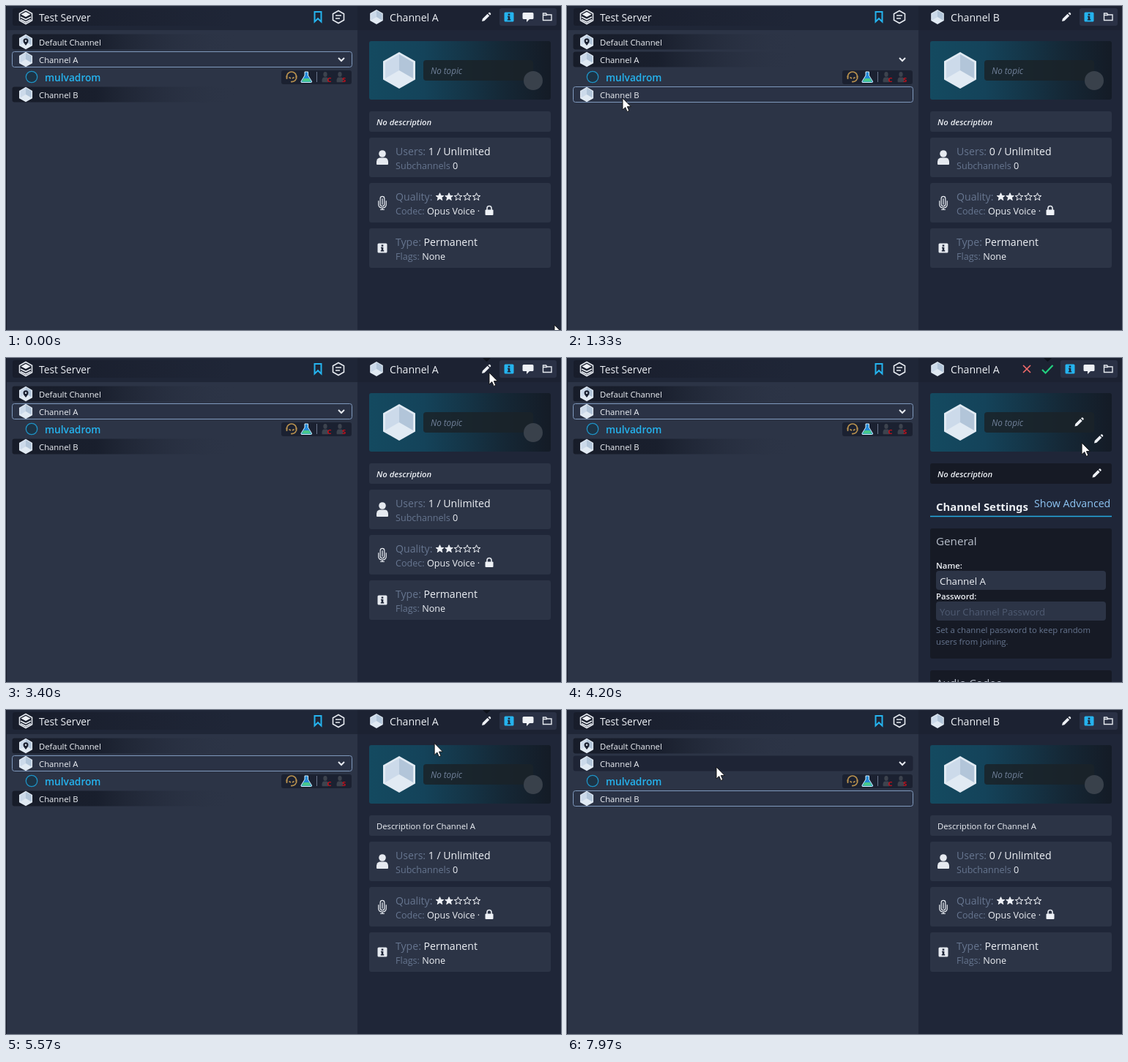
An HTML page for the animation above (8 s loop, 758 px wide and 443 px high).

```html
<!DOCTYPE html>
<html lang="en">
<head>
<meta charset="utf-8">
<title>Channel editing</title>
<style>
  html, body { margin: 0; width: 100%; height: 100%; overflow: hidden; background: #2c3446; }
  svg { display: block; width: 758px; height: 443px; }
  text { font: 500 11.3px "Open Sans", "Noto Sans", sans-serif; fill: #eef1f6; }
  .big { font-size: 14.1px; }
  .mid { font-size: 12.6px; }
  .label { fill: #66758f; font-weight: 400; }
  .strong { font-weight: 600; }
  .section { font-size: 15.2px; font-weight: 400; fill: #b9c0cc; }
  .badge { font-size: 9.5px; font-weight: 700; fill: #c9101b; }
  .card { fill: #2c3446; }
  .dark { fill: #161a25; }
  .user { font-size: 13.7px; font-weight: 600; fill: #25b3ee; }
  .title { font: 700 23px "Noto Sans", "Open Sans", sans-serif; font-stretch: 62.5%; }
  .line { fill: none; stroke: #e6eaf0; stroke-width: 1.6; }
</style>
</head>
<body>
<svg viewBox="0 0 758 443">
  <defs>
    <linearGradient id="rowFade">
      <stop stop-color="#171c29"/><stop offset=".25" stop-color="#191f2d"/>
      <stop offset=".66" stop-color="#2c3446" stop-opacity="0"/>
    </linearGradient>
    <linearGradient id="headFade">
      <stop stop-color="#181d2b"/><stop offset=".65" stop-color="#1f2637"/>
    </linearGradient>
    <linearGradient id="bannerFade">
      <stop stop-color="#144a60"/><stop offset=".3" stop-color="#14435a"/>
      <stop offset=".75" stop-color="#152735"/><stop offset="1" stop-color="#141b26"/>
    </linearGradient>
    <g id="cube">
      <path fill="#e1eaf3" d="M0-25 22-12.5V12.5L0 25-22 12.5V-12.5Z"/>
      <path fill="#ccdaea" d="M0 0V-22L-19-11V11Z"/>
      <path fill="#b2c5d9" d="M0 0V-22L19-11V11Z"/>
    </g>
    <g id="pencil" fill="#eef1f6">
      <path d="M-6 6-5.2 2.6 1.6-4.2 4.2-1.6-2.6 5.2ZM2.5-5.1 3.6-6.1Q4.3-6.5 5-5.9L5.9-5Q6.5-4.3 6.1-3.6L5.1-2.5Z"/>
    </g>
    <g id="info">
      <rect x="-6.5" y="-6.5" width="13" height="13" rx="1.6"/>
      <path fill="#1f2638" d="M-1.3-4.5h2.6v2.3h-2.6zM-2-1.2h3.3V3H2.2v1.5h-4.4V3h.9V.3H-2z"/>
    </g>
    <g id="person">
      <circle cy="-5" r="4.8"/>
      <path d="M-8 9V6Q-7.500 .6-3 .6H3Q7.500 .6 8 6V9Q8 10 7 10H-7Q-8 10-8 9Z"/>
    </g>
    <path id="star" stroke="#eef1f6" stroke-width="1" d="M0-5.300 1.500-1.700 5.300-1.500 2.300 .8 3.300 4.500 0 2.400-3.300 4.500-2.300 .8-5.300-1.500-1.500-1.700Z"/>
  </defs>

  <!-- left panel -->
  <rect width="480" height="443" fill="#2c3446"/>
  <rect width="480" height="33" fill="#1f2637"/>
  <rect x="9" y="3" width="463" height="24" rx="3" fill="url(#headFade)"/>
  <g transform="translate(27 15)">
    <path class="line" d="M0-9.500 8.500-4.800V4.800L0 9.500-8.500 4.800V-4.800Z"/>
    <path fill="#eef1f6" d="M0-7 6.500-3.500 0 0-6.500-3.500Z"/>
    <path class="line" d="M-7 0 0 3.500 7 0M-7 3.500 0 7 7 3.500"/>
  </g>
  <text style="font-size:13.8px" x="45" y="21">Test Server</text>
  <path d="M421.500 8h9v13.500l-4.500-4.300-4.500 4.300z" fill="none" stroke="#25b3ee" stroke-width="2"/>
  <path class="line" d="M454 6.500 461.500 10.700V19.300L454 23.500 446.500 19.300V10.700ZM450 13h8M450 17h6"/>
  <g id="rows"></g>
  <path class="line" style="stroke-width:2" d="M454 71 458 75 462 71"/>

  <circle cx="35" cy="97" r="7.700" fill="#1d3345" stroke="#1f92c4" stroke-width="1.300"/>
  <text class="user" x="53" y="103">mulvadrom</text>
  <rect x="376" y="88" width="96" height="19" rx="3" fill="#1b2131"/>
  <g fill="none" stroke="#b9924f" stroke-width="1.700">
    <path d="M383.500 98V96A6.500 6 0 0 1 396.500 96V98"/>
    <path d="M383.500 95v5M396.500 95v5M396 100Q394.500 104 389 103.500"/>
    <path d="M386.500 97.500l2.500 1.500M393.500 97.500l-2.500 1.500"/>
  </g>
  <path fill="#2389d7" stroke="#d7eef9" d="M408 90h4.500v5l5 8q.5 1.500-1 1.500h-12.500q-1.500 0-1-1.500l5-8z"/>
  <path fill="#49c98a" d="M406.500 99h7.500l2.500 4.500h-12.500z"/>
  <path d="M424.500 90v14" stroke="#69758c"/>
  <g fill="#3d434e">
    <use href="#person" transform="translate(436 97) scale(.55 .72)"/>
    <use href="#person" transform="translate(456 97) scale(.55 .72)"/>
  </g>
  <text class="badge" x="438.500" y="104">C</text>
  <text class="badge" x="459" y="104">S</text>
  <path d="M.5 0V443" stroke="#171c29"/>

  <!-- right panel -->
  <rect x="480" width="278" height="443" fill="#1f2638"/>
  <rect x="480" width="278" height="33" fill="#1c2232"/>
  <use href="#cube" transform="translate(506 15) scale(.4)"/>
  <text class="big" x="524" y="21" id="heading"></text>
  <path id="notch" fill="#0e121b" d="M651 0h11l-5.500 5z"/>
  <rect id="tabs" y="3" height="24" rx="3" fill="#2a3145"/>
  <use id="infoTab" href="#info" y="15" fill="#25b3ee"/>
  <path id="chatTab" fill="#eef1f6" d="M707 9h12q1.500 0 1.500 1.500v6q0 1.500-1.500 1.500h-4l-4 4v-4h-4q-1.500 0-1.500-1.500v-6q0-1.500 1.500-1.500z"/>
  <path class="line" style="stroke-width:1.400" d="M733.500 11v8.500h11.500v-7.500h-6l-1.500-2h-4zM733 12.500h6"/>
  <use id="editButton" href="#pencil" y="15"/>

  <rect x="496" y="48" width="248" height="80" rx="3" fill="url(#bannerFade)"/>
  <rect x="570" y="74" width="150" height="28" rx="4" fill="#1a2328" opacity=".85"/>
  <use href="#cube" x="537" y="88"/>
  <text x="580" y="93" style="font-size:11.700px;font-style:italic;fill:#71819a">No topic</text>
  <rect id="descBox" x="496" y="144" width="248" height="28" rx="3"/>
  <text x="506" y="163" id="desc"></text>

  <g id="view">
    <circle cx="720" cy="102" r="13" fill="#39414b"/>
    <rect class="card" x="496" y="180" width="248" height="54" rx="3"/>
    <rect class="card" x="496" y="242" width="248" height="54" rx="3"/>
    <rect class="card" x="496" y="304" width="248" height="54" rx="3"/>
    <use href="#person" x="514" y="207" fill="#e6eaf0"/>
    <g transform="translate(514 269) scale(.95)" class="line" style="stroke-width:1.300">
      <rect x="-3" y="-9" width="6" height="14" rx="3"/>
      <path d="M-5.500-3V3Q-5 7.500 0 7.500T5.500 3V-3M0 7.500V10M-3 10H3M0-6V3"/>
    </g>
    <use href="#info" x="514" y="331" fill="#e6eaf0"/>
    <text class="big" x="532" y="204"><tspan class="label">Users:</tspan> <tspan id="users"></tspan> / Unlimited</text>
    <text class="mid" x="532" y="223"><tspan class="label">Subchannels</tspan> 0</text>
    <text class="big label" x="532" y="266">Quality:</text>
    <g id="stars"></g>
    <text class="mid" x="532" y="285"><tspan class="label">Codec:</tspan> Opus Voice ·</text>
    <rect x="654.500" y="278.500" width="11" height="7.500" rx="1" fill="#eef1f6"/>
    <path class="line" d="M657 279V276.500a3 3 0 0 1 6 0V279"/>
    <text class="big" x="532" y="328"><tspan class="label">Type:</tspan> Permanent</text>
    <text class="mid" x="532" y="347"><tspan class="label">Flags:</tspan> None</text>
  </g>

  <g id="edit">
    <path d="M623 10l10 10M633 10l-10 10" stroke="#ef6a6a" stroke-width="1.700"/>
    <path d="M649 16l4.500 4.500 10-10.500" fill="none" stroke="#22d07f" stroke-width="2.200"/>
    <use href="#pencil" x="699.500" y="87.500"/>
    <use href="#pencil" x="726" y="110.500"/>
    <use href="#pencil" x="723.500" y="157.500"/>
    <text class="title" id="title" x="504" y="209">Channel Settings</text>
    <text x="638" y="204" style="font-size:14.200px;fill:#8ec5f4">Show Advanced</text>
    <path d="M496 216.500h248" stroke="#25a9e0" stroke-width="1.300"/>
    <rect class="dark" x="496" y="233" width="248" height="178" rx="3"/>
    <text class="section" x="504" y="256">General</text>
    <text class="strong" x="504" y="288">Name:</text>
    <rect class="card" x="504" y="291" width="232" height="26" rx="4"/>
    <text x="509" y="310" style="font-size:13.300px">Channel A</text>
    <text class="strong" x="504" y="330">Password:</text>
    <rect class="card" x="504" y="333" width="232" height="26" rx="4"/>
    <text x="509" y="352" style="font-size:13.100px;font-weight:400;fill:#4f5b72">Your Channel Password</text>
    <text class="label" x="504" y="376">Set a channel password to keep random</text>
    <text class="label" x="504" y="392">users from joining.</text>
    <rect class="dark" x="496" y="427" width="248" height="30" rx="3"/>
    <text class="section" x="504" y="450">Audio Codec</text>
  </g>

  <path id="cursor" fill="#fff" stroke="#111" stroke-width=".9" d="M0 0V16L3.700 12.600 6.200 18.400 8.800 17.300 6.300 11.600H11.300Z"/>
</svg>
<script>
const LOOP = 8000;
const $ = id => document.getElementById(id);
const show = (id, on) => $(id).setAttribute('visibility', on ? 'visible' : 'hidden');

const rows = [['Default Channel', 39], ['Channel A', 63], ['Channel B', 111]]
  .map(([name, y]) => ({ name, y }));
$('rows').innerHTML = rows.map(({ name, y }, i) => `
  <rect id="row${i}" x="8.500" y="${y - 0.5}" width="464" height="21" rx="3"/>
  <use href="#cube" transform="translate(27 ${y + 10}) scale(.41)"/>
  ${i ? '' : '<path fill="#1b2131" d="M27 54Q23.500 50 23.500 47.800a3.500 3.500 0 0 1 7 0Q30.500 50 27 54Z"/><circle cx="27" cy="47.800" r="1.200" fill="#dde6f0"/>'}
  <text x="45" y="${y + 14.5}">${name}</text>`).join('');

$('stars').innerHTML = [0, 1, 2, 3, 4].map(i =>
  `<use href="#star" x="${592.5 + 12.5 * i}" y="261" fill="${i < 2 ? '#eef1f6' : 'none'}"/>`).join('');

// A smaller title where no condensed face is installed, to stay clear of the link
const titleRoom = 126 / $('title').getComputedTextLength();
if (titleRoom < 1) $('title').style.fontSize = 23 * titleRoom + 'px';

// Cursor stops: time, x, y
const path = [
  [0, 749, 436], [30, 749, 436], [800, 85, 118], [870, 85, 118], [930, 76, 126],
  [1970, 76, 126], [2200, 117, 48], [2400, 113, 65], [2700, 113, 65], [3400, 660, 20],
  [4030, 660, 20], [4300, 722, 158], [4340, 722, 158], [4630, 655, 14], [5470, 655, 14],
  [5570, 586, 45], [5770, 400, 130], [5950, 250, 170], [6270, 114, 123], [6400, 114, 124],
  [7770, 114, 124], [7970, 204, 78], [LOOP, 204, 78]
];

// Speed at a stop; zero where the cursor rests before or after it
function speed(i, axis) {
  const a = path[i - 1], b = path[i], c = path[i + 1];
  const same = (p, q) => Math.hypot(p[1] - q[1], p[2] - q[2]) < 2;
  if (!a || !c || same(a, b) || same(b, c)) return 0;
  return (c[axis] - a[axis]) / (c[0] - a[0]);
}

function cursorAt(t) {
  const i = path.findIndex((p, k) => k + 1 < path.length && t < path[k + 1][0]);
  const a = path[i], b = path[i + 1], span = b[0] - a[0], u = (t - a[0]) / span;
  return [1, 2].map(axis => {
    const ease = u * u * (3 - 2 * u);
    return a[axis] + (b[axis] - a[axis]) * ease
      + span * u * (1 - u) * ((1 - u) * speed(i, axis) - u * speed(i + 1, axis));
  });
}

function draw(t) {
  const [x, y] = cursorAt(t);
  const selected = (t >= 1330 && t < 2700) || t >= 6900 ? 2 : 1;
  const joined = selected === 1;
  const editing = t >= 4030 && t < 5030;
  const described = t >= 4330;

  rows.forEach((row, i) => {
    const hovered = x >= 9 && x <= 472 && y >= row.y && y <= row.y + 20;
    const rect = $('row' + i), active = i === selected;
    rect.setAttribute('fill', active ? '#2a3245' : hovered ? '#1e2435' : 'url(#rowFade)');
    rect.setAttribute('stroke', active ? '#7f99bd' : 'none');
  });

  $('heading').textContent = rows[selected].name;
  $('users').textContent = joined ? 1 : 0;
  $('tabs').setAttribute('x', joined ? 674 : 700);
  $('tabs').setAttribute('width', joined ? 78 : 52);
  $('infoTab').setAttribute('x', joined ? 687 : 713);
  $('editButton').setAttribute('x', joined ? 656 : 682);
  show('chatTab', joined);
  show('editButton', !editing);
  show('view', !editing);
  show('edit', editing);
  show('notch', t >= 3340 && t < 5700);

  $('desc').textContent = described ? 'Description for Channel A' : 'No description';
  $('desc').style.fontStyle = described ? 'normal' : 'italic';
  $('desc').style.fontWeight = described ? 500 : 600;
  $('descBox').setAttribute('fill', editing ? '#161a25' : '#2c3446');
  $('cursor').setAttribute('transform', `translate(${x} ${y})`);
}

function tick() {
  draw(performance.now() % LOOP);
  requestAnimationFrame(tick);
}
tick();
</script>
</body>
</html>
```
